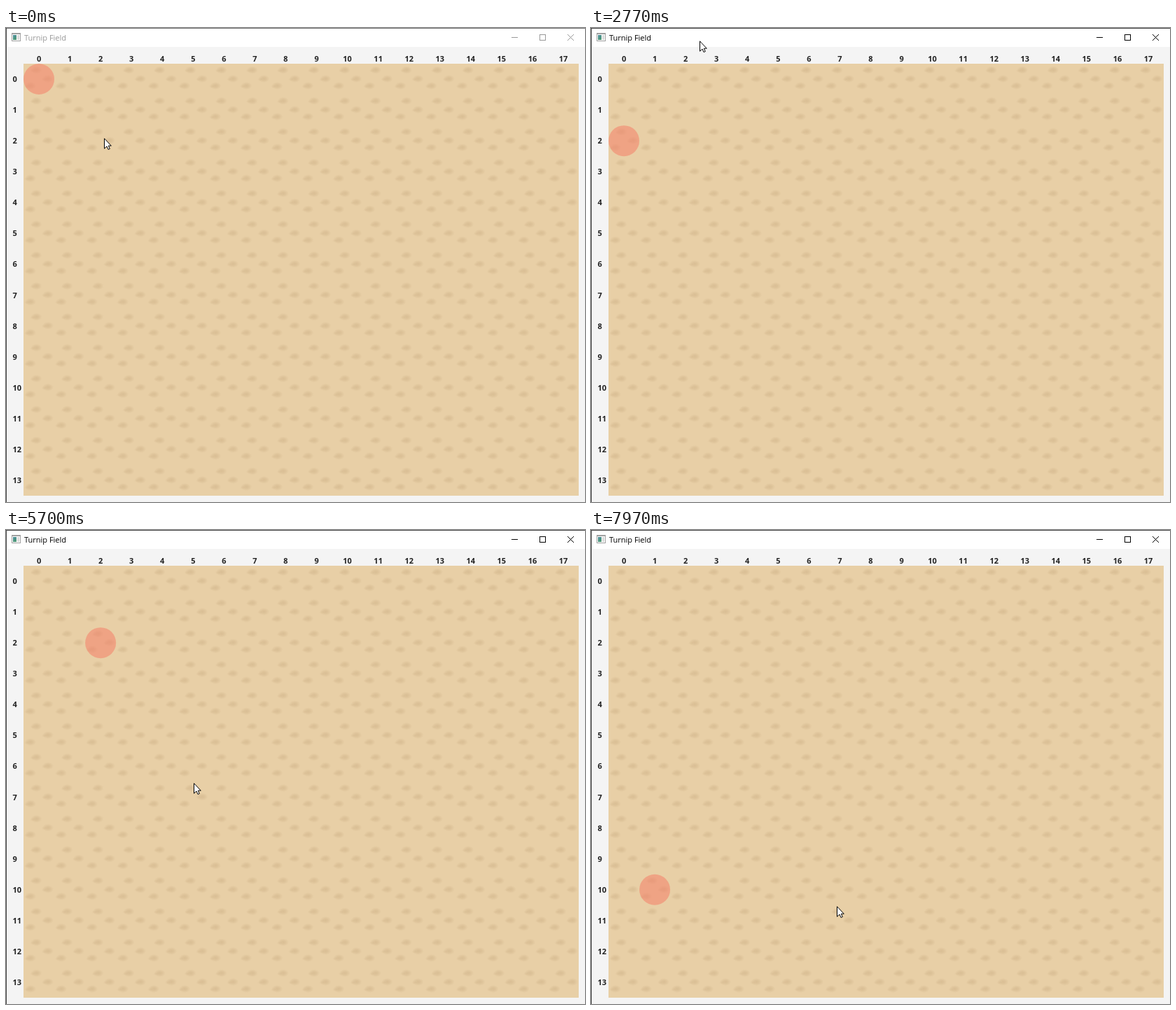
Write an HTML page with a canvas that moves like this. It is 827 px wide and 677 px high and loops after 8000 ms.

```html
<!DOCTYPE html>
<html lang="en">
<head>
<meta charset="utf-8">
<title>Turnip Field</title>
<style>
  html, body { margin: 0; width: 100%; height: 100%; overflow: hidden; background: #f4f4f4; }
  canvas { display: block; width: 827px; height: 677px; }
</style>
</head>
<body>
<canvas id="stage" width="827" height="677"></canvas>
<script>
const W = 827, H = 677, LOOP = 8000;
const FPS = 30;              // all times below count in this grid
const COLS = 18, ROWS = 14;
const FIELD = { x: 25, y: 51, w: 793, h: 617 };
const cellW = FIELD.w / COLS, cellH = FIELD.h / ROWS;
const ctx = document.getElementById('stage').getContext('2d');

// Pointer moves follow on from each other; without handles they ease along a line.
const START = [140, 157];
const moves = [
  { at: 13, steps: 6, via: [[-35, 120], [30, 40]], to: [462, 34] },
  { at: 35, steps: 1, to: [155, 18] },
  { at: 161, steps: 9, via: [[110, 200], [315, 590]], to: [516, 296] },
  { at: 187, steps: 5, to: [355, 412] },
  { at: 207, steps: 1, to: [355, 417] },
  { at: 209, steps: 6, to: [110, 496] },
  { at: 225, steps: 1, to: [106, 497] },
  { at: 231, steps: 4, to: [351, 537] }
];
const away = { from: 27, to: 37 };
const FOCUS = 43;

// Arrow keys shift the marker one cell, clicks bring it to the pointer.
const actions = [
  { at: 71, dy: 1 }, { at: 83, dy: 1 }, { at: 93, dx: 1 }, { at: 101, dx: 1 },
  { at: 117, dy: -1 }, { at: 125, dy: -1 }, { at: 135, dy: 1 }, { at: 143, dy: 1 },
  { at: 187, click: true }, { at: 209, click: true }, { at: 233, click: true }
];

function bezier(a, b, c, d, s) {
  const r = 1 - s;
  return r * r * r * a + 3 * r * r * s * b + 3 * r * s * s * c + s * s * s * d;
}

function pointerAt(frame) {
  let pos = START;
  for (const { at, steps, via, to } of moves) {
    if (at > frame) break;
    const s = Math.min(1, Math.floor((frame - at) / 2) / steps);
    const from = pos;
    const [b, c] = via || [from, to];
    pos = [0, 1].map(k => Math.round(bezier(from[k], b[k], c[k], to[k], s)));
  }
  return pos;
}

function markerAt(frame) {
  let col = 0, row = 0;
  for (const { at, dx = 0, dy = 0, click } of actions) {
    if (at > frame) break;
    if (click) {
      const [x, y] = pointerAt(at - 1);
      col = Math.floor((x - FIELD.x) / cellW);
      row = Math.floor((y - FIELD.y) / cellH);
    }
    col += dx;
    row += dy;
  }
  return [col, row];
}

function blob(c, x, y, rx, ry, alpha) {
  c.save();
  c.translate(x, y);
  c.scale(rx, ry);
  const g = c.createRadialGradient(0, 0, 0, 0, 0, 1);
  g.addColorStop(0, `rgba(160,125,80,${alpha})`);
  g.addColorStop(0.4, `rgba(160,125,80,${alpha * 0.75})`);
  g.addColorStop(1, 'rgba(160,125,80,0)');
  c.fillStyle = g;
  c.fillRect(-1, -1, 2, 2);
  c.restore();
}

function clod(c, x, y) {
  blob(c, x, y, 8, 5.5, 0.2);
  blob(c, x - 5.5, y + 1, 4, 2.5, 0.07);
}

function soil(c, x, y) {
  clod(c, x + 18.5, y + 9);
  clod(c, x + 35, y + 21.5);
  clod(c, x + 10, y + 31.5);
}

function label(c, text, x, y, align) {
  c.textAlign = align;
  c.fillText(text, x, y);
}

function makeBoard() {
  const board = document.createElement('canvas');
  board.width = W;
  board.height = H;
  const c = board.getContext('2d');
  c.fillStyle = '#f4f4f4';
  c.fillRect(0, 0, W, H);
  c.fillStyle = '#e8cfa6';
  c.fillRect(FIELD.x, FIELD.y, FIELD.w, FIELD.h);
  for (let row = 0; row < ROWS; row++) {
    for (let col = 0; col < COLS; col++) {
      soil(c, FIELD.x + col * cellW, FIELD.y + row * cellH);
    }
  }
  c.font = 'bold 11px "Open Sans", "Noto Sans", sans-serif';
  c.fillStyle = '#222';
  for (let i = 0; i < COLS; i++) label(c, i, FIELD.x + (i + 0.5) * cellW, 48, 'center');
  for (let i = 0; i < ROWS; i++) label(c, i, 9.5, Math.round(FIELD.y + (i + 0.5) * cellH + 4), 'left');
  return board;
}

function drawIcon() {
  ctx.fillStyle = '#a0a0a0';
  ctx.fillRect(8, 7, 13, 12);
  ctx.fillStyle = '#fff';
  ctx.fillRect(9, 9, 11, 9);
  const g = ctx.createLinearGradient(10, 10, 14, 17);
  g.addColorStop(0, '#4f8fa0');
  g.addColorStop(1, '#4f9a72');
  ctx.fillStyle = g;
  ctx.fillRect(10, 10, 5, 7);
  ctx.fillStyle = '#dcdcdc';
  ctx.fillRect(16, 10, 3, 7);
}

function drawTitleBar(active) {
  ctx.fillStyle = '#fff';
  ctx.fillRect(0, 0, W, 27);
  ctx.fillStyle = active ? '#4a4a4a' : '#777';
  ctx.fillRect(0, 0, W, 1);
  ctx.fillStyle = '#444';
  ctx.fillRect(0, 0, 1, H);
  drawIcon();

  const ink = active ? '#000' : '#999';
  ctx.fillStyle = ink;
  ctx.font = '11px "Open Sans", "Noto Sans", sans-serif';
  label(ctx, 'Turnip Field', 26, 18, 'left');

  ctx.strokeStyle = ink;
  ctx.lineWidth = 1;
  ctx.fillRect(722, 13, 9, 1);
  ctx.strokeRect(762.5, 9.5, 8, 8);
  ctx.beginPath();
  ctx.moveTo(802, 9);
  ctx.lineTo(811, 18);
  ctx.moveTo(811, 9);
  ctx.lineTo(802, 18);
  ctx.stroke();
}

function drawMarker([col, row]) {
  ctx.fillStyle = 'rgba(245,126,102,0.53)';
  ctx.beginPath();
  ctx.arc(FIELD.x + (col + 0.5) * cellW, FIELD.y + (row + 0.5) * cellH, 22, 0, Math.PI * 2);
  ctx.fill();
}

const arrow = new Path2D('M.5 .8V15.2L4 12L6.1 16.5L8.3 15.5L6.3 11.2H10.3Z');

function drawPointer([x, y]) {
  ctx.save();
  ctx.translate(x, y);
  ctx.fillStyle = '#fff';
  ctx.fill(arrow);
  ctx.strokeStyle = '#000';
  ctx.lineWidth = 1;
  ctx.stroke(arrow);
  ctx.restore();
}

const board = makeBoard();

function draw(now) {
  // a small lead absorbs rounding of the time grid
  const frame = Math.floor((now % LOOP + 4) * FPS / 1000);
  ctx.drawImage(board, 0, 0);
  drawTitleBar(frame >= FOCUS);
  drawMarker(markerAt(frame));
  if (frame < away.from || frame >= away.to) drawPointer(pointerAt(frame));
}

const begin = performance.now();
function tick() {
  draw(performance.now() - begin);
  requestAnimationFrame(tick);
}
tick();
</script>
</body>
</html>
```
